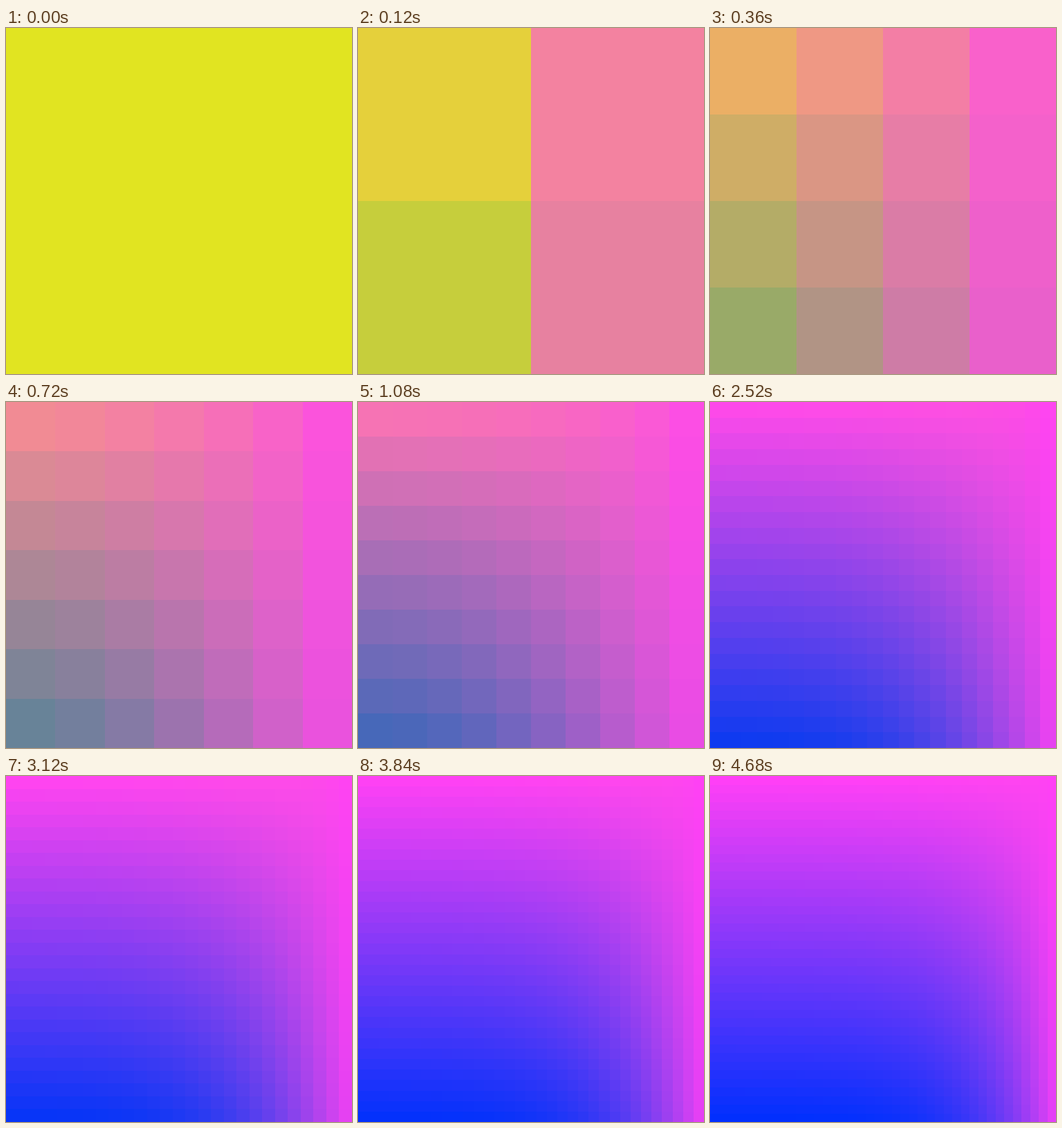
An HTML page with a canvas for the animation above (4800 ms loop, 500x500 px).

```html
<!DOCTYPE html>
<html lang="en">
<head>
<meta charset="utf-8">
<title>Refining gradient</title>
<style>
  html, body { margin: 0; width: 100%; height: 100%; overflow: hidden; background: rgb(225, 228, 33); }
  canvas { display: block; width: 500px; height: 500px; }
</style>
</head>
<body>
<canvas id="stage" width="500" height="500"></canvas>
<script>
const SIZE = 500, STEP_MS = 120, STEPS = 40;
const YELLOW = [225, 228, 33], PINK = [255, 62, 248], BLUE = [0, 46, 255];
const ctx = document.getElementById("stage").getContext("2d");

const mix = (a, b, t) => a.map((v, i) => v + (b[i] - v) * t);

// Yellow fades step by step, slower to the right; pink closes in from the right edge.
function cellColor(col, row, n) {
  const x = col / n;
  const y = n > 1 ? row / (n - 1) : 0;
  const yellow = 0.88 ** ((n - 1) * (1 - 0.6 * x * x));
  const pink = x ** (1.1 + 0.11 * (n - 4));
  const base = mix(mix(PINK, BLUE, y), YELLOW, yellow);
  return mix(base, PINK, pink);
}

function drawGrid(n) {
  const edge = i => Math.round(i * SIZE / n);
  for (let row = 0; row < n; row++) {
    for (let col = 0; col < n; col++) {
      const left = edge(col), top = edge(row);
      ctx.fillStyle = `rgb(${cellColor(col, row, n).map(Math.round).join(",")})`;
      ctx.fillRect(left, top, edge(col + 1) - left, edge(row + 1) - top);
    }
  }
}

const start = performance.now();
let shown = 0;

function render(now) {
  const elapsed = Math.max(0, now - start);
  const n = Math.floor(elapsed / STEP_MS) % STEPS + 1;
  if (n !== shown) {
    drawGrid(n);
    shown = n;
  }
  requestAnimationFrame(render);
}
render(start);
</script>
</body>
</html>
```
